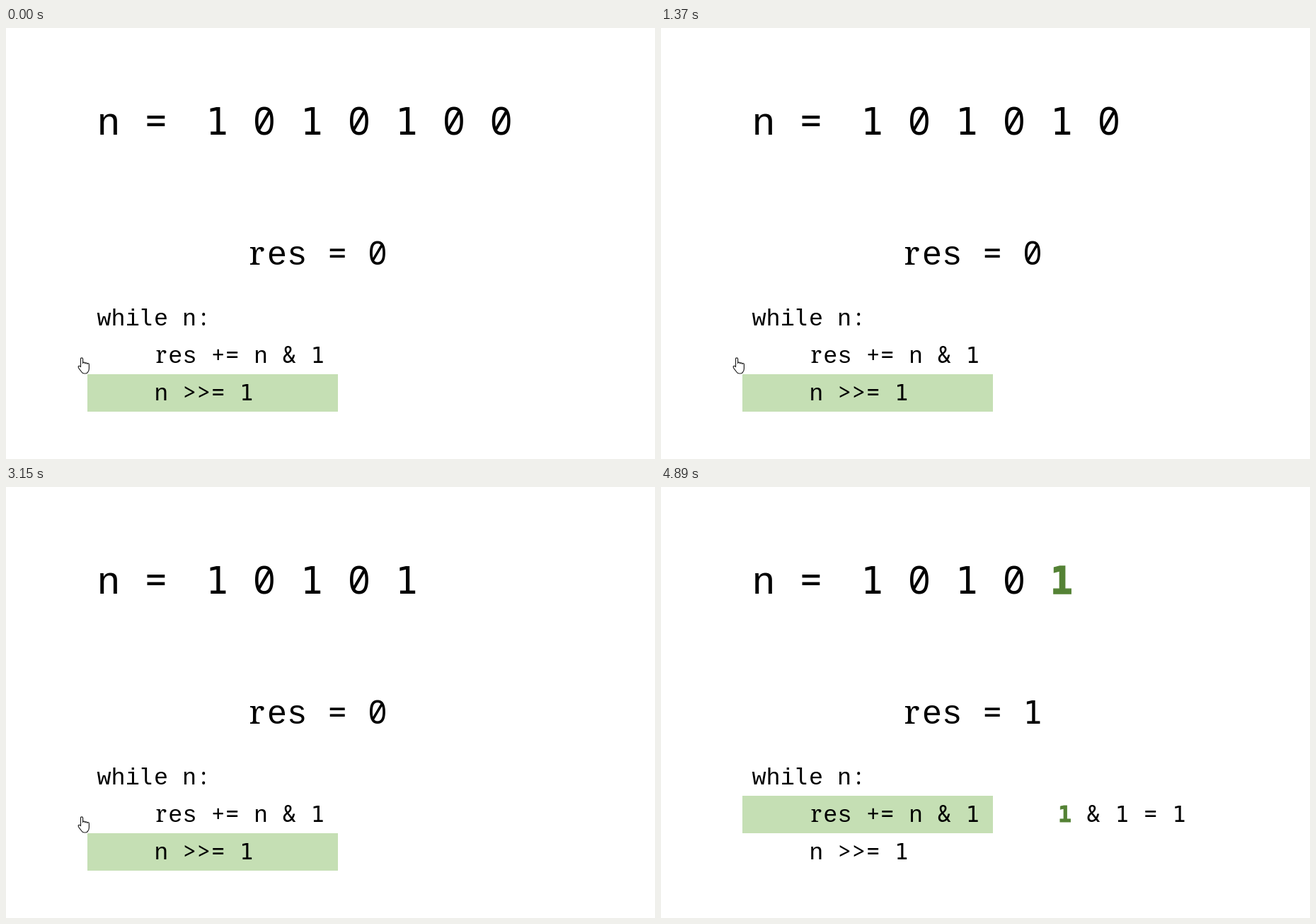
Write an HTML page that moves like this. It is 917 px wide and 610 px high and loops after 5.01 s.

```html
<!DOCTYPE html>
<html lang="en">
<head>
<meta charset="utf-8">
<title>Counting set bits</title>
<style>
  html, body { margin: 0; width: 100%; height: 100%; overflow: hidden; background: #fff; }
  svg { display: block; width: 100vw; height: 100vh; }
  text { font-family: "Noto Sans Mono", "DejaVu Sans Mono", monospace; text-anchor: middle; white-space: pre; }
  .tail { font-family: "DejaVu Sans Mono", monospace; }
  .letter { font-family: "Liberation Mono", monospace; }
  .slab { font-family: "Noto Serif", serif; }
  .active { fill: #548235; stroke: #548235; stroke-width: 0.025em; font-weight: 700; }
</style>
</head>
<body>
<svg id="stage" viewBox="0 0 917 610">
  <rect id="bar" x="115" y="490" width="354" height="53" fill="#c5dfb4"/>
  <g id="lines"></g>
  <path id="hand" fill="#fff" stroke="#222" stroke-width="1.2" stroke-linejoin="round"
    d="M4.5 14.5V3.6Q4.5 1.8 6 1.8Q7.6 1.8 7.6 3.6V9.5q0-1.3 1.5-1.3q1.5 0 1.5 1.6q.2-1 1.5-1q1.4 0 1.4 1.6q.3-.8 1.4-.8q1.5 0 1.5 1.6V17Q16.4 20 14.5 22.2Q13.6 24 11.5 24H9.4Q7.2 24 6 22L2 16.8Q.6 14.4 1.6 13.5Q2.8 12.7 4.5 14.5Z"/>
</svg>
<script>
const LOOP = 5010;
const NS = "http://www.w3.org/2000/svg";
const lines = document.getElementById("lines");
const bar = document.getElementById("bar");
const hand = document.getElementById("hand");

// Font class and relative size for a character.
function face(ch) {
  if (ch === "1" || ch === "l") return ["tail", 0.945];
  if (ch === "r") return ["slab", 0.98];
  if (/[a-z]/.test(ch)) return ["letter", 1];
  return ["", 0.965];
}

// One line of text on a fixed pitch; returns its character spans.
function addLine(str, left, base, pitch, stride = pitch) {
  const line = document.createElementNS(NS, "text");
  line.setAttribute("y", base);
  const spans = [...str].map((ch, i) => {
    const span = document.createElementNS(NS, "tspan");
    const [font, scale] = face(ch);
    span.setAttribute("class", font);
    span.setAttribute("x", (left + pitch / 2 + i * stride).toFixed(2));
    span.setAttribute("font-size", (pitch / 0.6 * scale).toFixed(2));
    span.textContent = ch;
    line.append(span);
    return span;
  });
  lines.append(line);
  return { line, spans };
}

const show = (el, on) => el.setAttribute("visibility", on ? "visible" : "hidden");

addLine("n =", 128.2, 151, 33.5);
const bits = addLine("1010100", 281.3, 151, 33.5, 66.95).spans;
const results = ["0", "1"].map(v => addLine("res = " + v, 340.3, 335, 28.4).line);
addLine("while n:", 128.5, 421, 20.1);
addLine("res += n & 1", 209.2, 474, 20.1);
addLine("n >>= 1", 209.2, 527, 20.1);
const sums = ["0", "1"].map(v => {
  const sum = addLine(`${v} & 1 = ${v}`, 560.5, 474, 20.18);
  sum.spans[0].classList.add("active");
  return sum.line;
});

// start time, bits left, result, value being added (-1: shifting)
const steps = [
  [0, 7, 0, -1],
  [160, 7, 0, 0],
  [1170, 6, 0, -1],
  [2140, 6, 0, 0],
  [3150, 5, 0, -1],
  [4160, 5, 1, 1]
];

function setStep([, count, res, add]) {
  bits.forEach((bit, i) => {
    show(bit, i < count);
    bit.classList.toggle("active", add >= 0 && i === count - 1);
  });
  results.forEach((el, v) => show(el, v === res));
  sums.forEach((el, v) => show(el, v === add));
  bar.setAttribute("y", add >= 0 ? 437 : 490);
}

function moveHand(t) {
  let x = 101, y = 465;
  if (t >= 4160) { x = 102; y = 464; }
  if (t >= 4650) {
    const p = Math.min(1, (Math.floor((t - 4650) / 40) + 1) / 6);
    x += 14 * p;
    y += 102 * p ** 1.5;
  }
  hand.setAttribute("transform", `translate(${x.toFixed(2)} ${y.toFixed(2)})`);
  show(hand, t < 4890);
}

let current = null;
const start = performance.now();

function draw(now) {
  const t = Math.max(0, now - start) % LOOP;
  const step = steps.findLast(s => s[0] <= t);
  if (step !== current) setStep(current = step);
  moveHand(t);
  requestAnimationFrame(draw);
}
draw(start);
</script>
</body>
</html>
```
